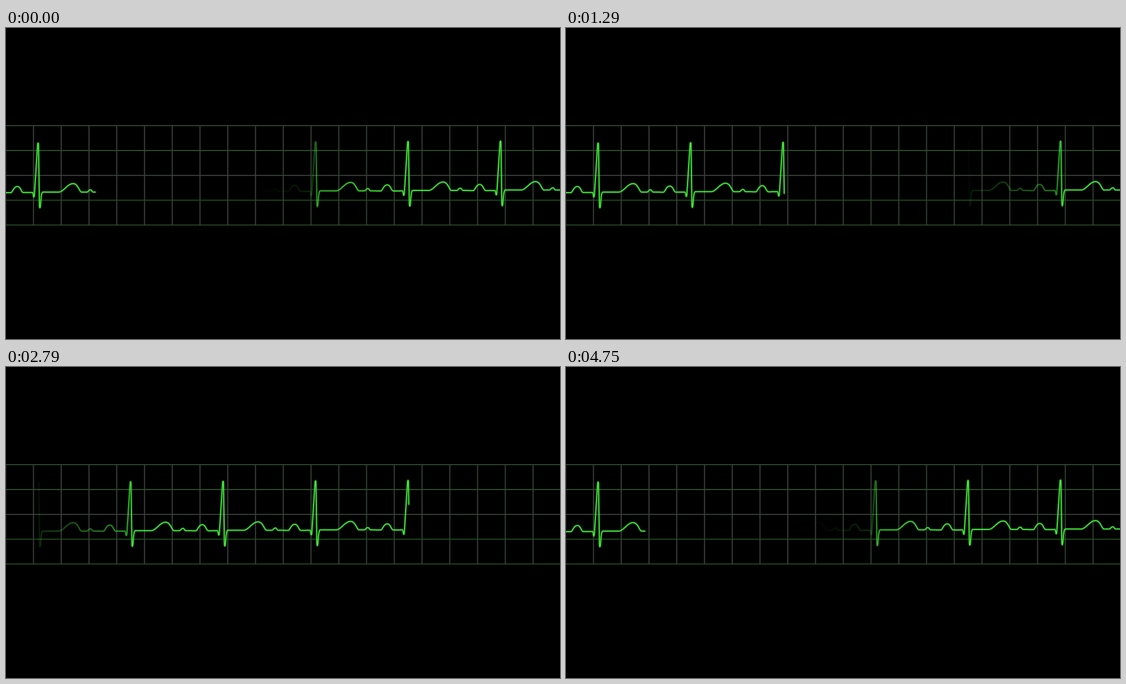
Write an HTML page with a canvas that moves like this. It is 998 by 561 pixels and loops after 4.79 s.

```html
<!DOCTYPE html>
<html lang="en">
<head>
<meta charset="utf-8">
<title>Heart monitor</title>
<style>
html, body { margin: 0; width: 100%; height: 100%; overflow: hidden; background: #000; }
canvas { display: block; }
</style>
</head>
<body>
<canvas id="stage" width="998" height="561"></canvas>
<script>
const W = 998, H = 561, LOOP = 4790;
const CLEAR_AT = 1380;                   // the old sweep is wiped here
const FADE_FROM = 2200, FADE_TO = 3350;  // age of the trace in ms
const TILT = 0.0044;
const ctx = document.getElementById('stage').getContext('2d');

// One heartbeat: P wave, QRS spike, T wave, small U wave.
const BEAT = [
  'c3 -1 5 -11 11.5 -11 c6 0 7 11 11 11 h16.5',
  'c1 0 1 8 2.3 8 c1 0 1.2 -10 1.7 -17',
  'l5 -78 c.4 -3 1.4 -3 1.6 0 l1.6 111',
  'c.4 5 1.2 5 1.8 0 c1 -8 1 -24.7 4.5 -24.7 h29.5',
  'c9 -2 15 -15 25 -15 c9 0 11 15.3 15.5 15.3 h9',
  'c2.5 0 3.5 -4 6.5 -4 c3 0 2.5 4 5.5 4 l18.1 .4'
].join(' ');

// Points one pixel of path apart, so an index is a length along the trace.
function tracePoints() {
  const path = document.createElementNS('http://www.w3.org/2000/svg', 'path');
  path.setAttribute('d', 'M0 297 h9 ' + (BEAT + ' ').repeat(6));
  const pts = [], len = path.getTotalLength();
  for (let s = 0; s < len; s++) {
    const p = path.getPointAtLength(s);
    if (p.x > W) break;
    pts.push([p.x, p.y - TILT * p.x]);
  }
  return pts;
}

const trace = tracePoints();
const LEN = trace.length;

function lengthNear(x, y) {
  let best = 0, min = Infinity;
  trace.forEach(([px, py], i) => {
    const d = Math.hypot(px - x, py - y);
    if (d < min) { min = d; best = i; }
  });
  return best;
}

// Time and length of the pen tip at a few known places.
const keys = [
  [0, 160, 296], [960, 385, 290], [1630, 511, 294],
  [2790, 726, 247], [3500, 889.5, 210]
].map(([t, x, y]) => [t, lengthNear(x, y)]);
keys.push([4750, LEN + lengthNear(141, 296)], [LOOP, LEN + keys[0][1]]);

function headAt(t) {
  let i = 1;
  while (i < keys.length - 1 && t > keys[i][0]) i++;
  const [t0, s0] = keys[i - 1], [t1, s1] = keys[i];
  return s0 + (s1 - s0) * (t - t0) / (t1 - t0);
}

// Length of the trace at every second pixel column.
const columns = [];
for (let x = 0, i = 0; x <= W; x += 2) {
  while (i < LEN - 1 && trace[i][0] < x) i++;
  columns.push(i);
}

function fade(dist) {
  const age = dist / LEN * LOOP;
  const u = Math.min(1, Math.max(0, (age - FADE_FROM) / (FADE_TO - FADE_FROM)));
  return 1 - u * u * (3 - 2 * u);
}

function drawSweep(head) {
  const end = Math.min(head, LEN - 1), whole = Math.floor(end);
  if (end <= 0) return;
  const paint = ctx.createLinearGradient(0, 0, W, 0);
  columns.forEach((s, i) =>
    paint.addColorStop(i * 2 / W, `rgba(64,232,56,${fade(head - s).toFixed(3)})`));

  ctx.beginPath();
  for (let i = 0; i <= whole; i++) ctx.lineTo(trace[i][0], trace[i][1]);
  if (whole < LEN - 1) {
    const a = trace[whole], b = trace[whole + 1], f = end - whole;
    ctx.lineTo(a[0] + (b[0] - a[0]) * f, a[1] + (b[1] - a[1]) * f);
  }
  ctx.strokeStyle = paint;
  ctx.lineJoin = ctx.lineCap = 'round';
  ctx.globalAlpha = 0.2;
  ctx.lineWidth = 4.6;
  ctx.stroke();
  ctx.globalAlpha = 1;
  ctx.lineWidth = 2;
  ctx.stroke();
}

function line(x1, y1, x2, y2, color) {
  ctx.strokeStyle = color;
  ctx.beginPath();
  ctx.moveTo(x1, y1);
  ctx.lineTo(x2, y2);
  ctx.stroke();
}

function drawGrid() {
  ctx.lineCap = 'butt';
  ctx.lineWidth = 1.8;
  for (let i = 0; i < 20; i++) {
    const color = i < 10 ? '#414541' : '#384837';
    line(i * 50 - 0.5, 176, i * 50 - 0.5, 355.5, color);
  }
  ['#364c36', '#2b4e29', '#3c433c', '#225022', '#2d4b2d'].forEach((color, i) => {
    const y = 176.2 + i * 44.8;
    line(0, y, W, y, color);
  });
}

function draw(t) {
  const head = headAt(t);
  ctx.fillStyle = '#000';
  ctx.fillRect(0, 0, W, H);
  drawGrid();
  if (t < CLEAR_AT) drawSweep(head + LEN);
  drawSweep(head);
  if (head > LEN) drawSweep(head - LEN);
}

function tick() {
  draw(performance.now() % LOOP);
  requestAnimationFrame(tick);
}
tick();
</script>
</body>
</html>
```
